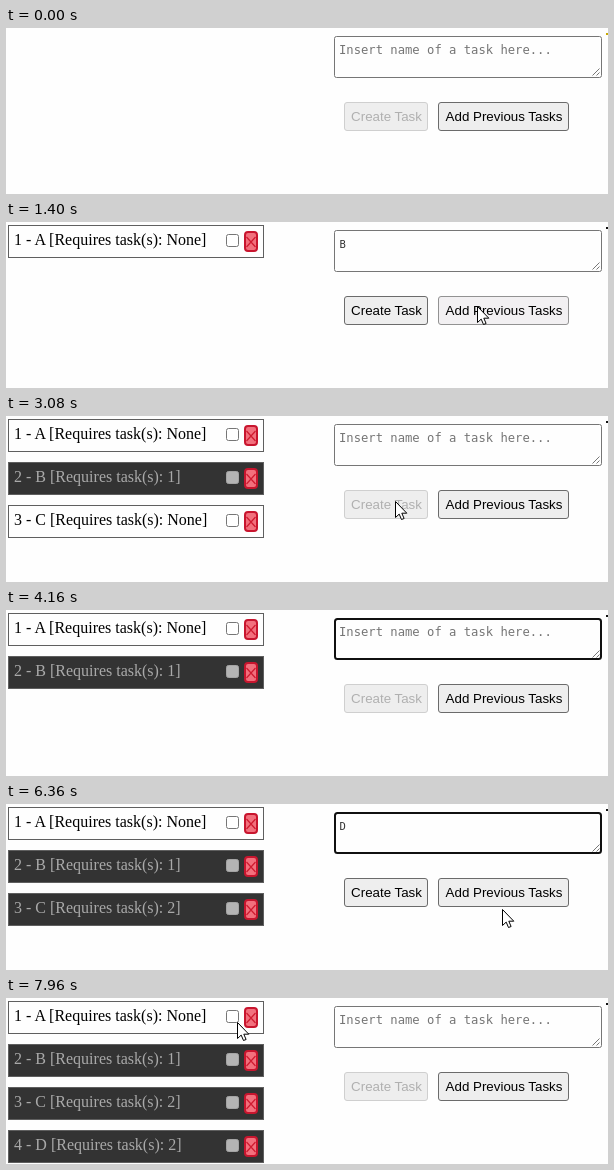
Recreate the animation shown at these times as an HTML page. Size 602 by 166 pixels, loop 8 s.

```html
<!DOCTYPE html>
<html lang="en">
<head>
<meta charset="utf-8">
<title>Task list</title>
<style>
  html, body { margin: 0; width: 100%; height: 100%; overflow: hidden; background: #fefefe; }
  svg { display: block; width: 602px; height: 166px; }
  text { white-space: pre; }
  .serif { font: 16px "Liberation Serif", "Times New Roman", serif; }
  .sans { font: 13.333px "Liberation Sans", Arial, sans-serif; text-anchor: middle; }
  .mono { font: 12.2px "DejaVu Sans Mono", monospace; }
  .typed { font-size: 10.5px; }
  .ui { font: 12.5px "Open Sans", "Noto Sans", sans-serif; }
</style>
</head>
<body>
<svg id="stage" viewBox="0 0 602 166"></svg>
<script>
const LOOP = 8000, TICK = 40;
const stage = document.getElementById('stage');

// One round per task; the remaining times follow from these
const rounds = [
  { name: 'A', focus: 240, type: 320 },
  { name: 'B', focus: 960, type: 1120, prompt: 1440, needs: '1' },
  { name: 'C', focus: 2480, type: 2720, removed: 3640 },
  { name: 'C', focus: 4080, type: 4400, prompt: 5040, needs: '2' },
  { name: 'D', focus: 6080, type: 6240, prompt: 6600, needs: '2' }
];
const stops = [];
function hold(arrive, leave, x, y) { stops.push({ arrive, leave, x, y }); }

hold(0, 80, 620, 118);
for (const r of rounds) {
  hold(r.focus, r.type, 450, 33);
  if (r.prompt) {
    r.reply = r.prompt + 320;
    r.close = r.reply + 200;
    hold(r.prompt - 80, r.prompt, 471, 84);
    hold(r.prompt + 160, r.close, 620, 105);
  }
  r.create = (r.close || r.type) + 320;
  r.blur = r.prompt ? r.prompt - 40 : r.create;
  hold(r.create - 80, r.create + 80, 389, 85);
  if (r.removed) hold(r.removed - 80, r.removed, 245, 105);
}
hold(6360, 6360, 496, 105);
hold(7960, LOOP, 231, 24);
stops.sort((a, b) => a.arrive - b.arrive);

function add(parent, tag, attrs, content) {
  const el = document.createElementNS('http://www.w3.org/2000/svg', tag);
  set(el, attrs);
  if (content !== undefined) el.textContent = content;
  parent.appendChild(el);
  return el;
}
function set(el, attrs) { for (const k in attrs) el.setAttribute(k, attrs[k]); }
// Box with a border drawn inside its outer edges
function box(parent, x, y, w, h, fill, stroke, line = 1, rx = 0) {
  return add(parent, 'rect', {
    x: x + line / 2, y: y + line / 2, width: w - line, height: h - line,
    rx, fill, stroke, 'stroke-width': line
  });
}
function label(parent, cls, x, y, fill, content) {
  return add(parent, 'text', { class: cls, x, y, fill }, content);
}
function show(el, on) { el.style.display = on ? '' : 'none'; }

// Task rows
for (const r of rounds) {
  const slot = 'ABCD'.indexOf(r.name);
  const locked = Boolean(r.needs);
  const g = r.row = add(stage, 'g', { transform: `translate(0 ${3 + slot * 43})` });
  box(g, 2, 0, 256, 33, locked ? '#333' : '#fefefe', '#5f5f5f');
  label(g, 'serif', 8, 20, locked ? '#a9a9a9' : '#000',
    `${slot + 1} - ${r.name} [Requires task(s): ${r.needs || 'None'}]`);
  box(g, 220, 9, 13, 13, locked ? '#b4b4b4' : '#fff', locked ? '#a4a4a4' : '#767676', 1, 2);
  box(g, 238, 6, 14, 21, '#f2707d', '#c8152e', 2, 3);
  add(g, 'path', { d: 'M240.5 12l9 10m0-10l-9 10', stroke: '#d01b30', 'stroke-width': 1.2 });
}

// Task form
const area = box(stage, 328, 8, 268, 42, '#fefefe', '#767676', 1, 2);
const ring = box(stage, 328, 8, 268, 42, 'none', '#101010', 2, 2.5);
add(stage, 'path', { d: 'M586.5 47.5l7-7m-3 7l3-3', stroke: '#777' });
const hint = label(stage, 'mono', 333, 26, '#757575', 'Insert name of a task here...');
const typed = label(stage, 'mono typed', 333.5, 25.5, '#333');

function button(x, w, name) {
  return {
    x, w,
    face: box(stage, x, 74, w, 29, '#efefef', '#6b6b6b', 1, 2.5),
    text: label(stage, 'sans', x + w / 2 + 0.5, 93, '#000', name)
  };
}
const create = button(338, 84, 'Create Task');
const previous = button(432, 131, 'Add Previous Tasks');
const speck = add(stage, 'rect', { x: 600, y: 5, width: 2, height: 2 });

// Prompt dialog, cut off at the edge of the page
const page = add(add(stage, 'clipPath', { id: 'page' }), 'rect', { width: 600, height: 166 });
const dialog = add(stage, 'g', { 'clip-path': 'url(#page)' });
for (const spread of [1, 2, 4])
  add(dialog, 'rect', {
    x: 429 - spread / 2, y: -10, width: 200, height: 155 + spread, rx: 3, opacity: 0.15
  });
add(dialog, 'rect', { x: 429, y: -10, width: 200, height: 155, rx: 3, fill: '#292a2c' });
label(dialog, 'ui', 445, 27, '#f4f5f7', 'Enter the number of the task');
box(dialog, 444, 40, 190, 34, '#1f2023', '#56677b', 2, 3);
const answer = label(dialog, 'ui', 453, 61, '#f4f5f7');
const caret = add(dialog, 'rect', { y: 49, width: 1, height: 15, fill: '#f4f5f7' });

const pointer = add(stage, 'path', {
  d: 'M0 0V16L3.7 12.6 6 18 8.6 17 6.3 11.7H11.3Z', fill: '#fff', stroke: '#000'
});

function pointerAt(t) {
  const i = stops.findIndex(s => t <= s.leave);
  const to = stops[i];
  if (t >= to.arrive) return [to.x, to.y];
  const from = stops[i - 1];
  const p = (t - from.leave) / (to.arrive - from.leave);
  const ease = p * p * (3 - 2 * p);
  return [from.x + (to.x - from.x) * ease, from.y + (to.y - from.y) * ease];
}

function paint(btn, enabled, x, y) {
  const hover = enabled && x >= btn.x && x < btn.x + btn.w && y >= 74 && y < 103;
  set(btn.face, {
    fill: hover ? '#f2f0f2' : '#eee',
    stroke: !enabled ? '#cfcfcf' : hover ? '#929292' : '#6b6b6b'
  });
  set(btn.text, { fill: enabled ? '#000' : '#b0b0b0' });
}

function render(t) {
  for (const r of rounds) show(r.row, t >= r.create && t < (r.removed || LOOP));

  const now = rounds.find(r => t < r.create) || {};
  const value = t >= now.type ? now.name : '';
  const focused = t >= now.focus && t < now.blur;
  const open = t >= now.prompt && t < now.close;
  const reply = t >= now.reply ? now.needs : '';

  typed.textContent = value;
  show(hint, !value);
  show(area, !focused);
  show(ring, focused);
  show(dialog, open);
  answer.textContent = reply;
  set(caret, { x: reply ? 460 : 453 });
  set(speck, { fill: t < 80 ? '#c9a800' : '#111' });

  const [x, y] = pointerAt(t).map(Math.round);
  const overText = !open && x > 328 && x < 596 && y > 8 && y < 50;
  show(pointer, !overText);
  set(pointer, { transform: `translate(${x + 0.5} ${y + 0.5})` });
  paint(create, Boolean(value), x, y);
  paint(previous, true, x, y);
}

const start = performance.now();
function frame() {
  const t = (performance.now() - start) % LOOP;
  render(Math.floor(t / TICK) * TICK);
  requestAnimationFrame(frame);
}
frame();
</script>
</body>
</html>
```
